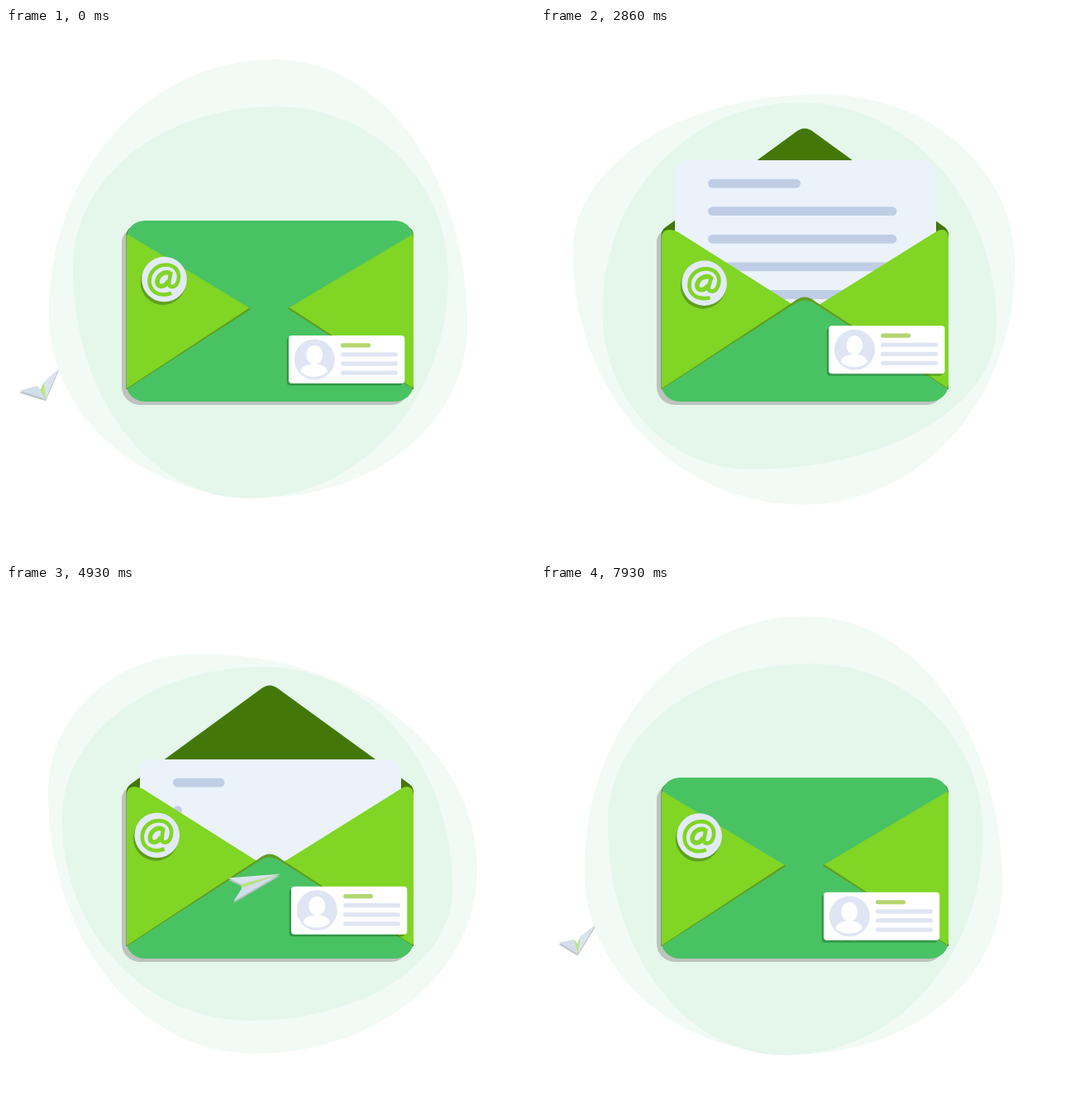
Recreate the animation shown at these times as an HTML page with a canvas. Size 640 px wide and 640 px high, loop 8000 ms.

```html
<!DOCTYPE html>
<html lang="en">
<head>
<meta charset="utf-8">
<title>Email envelope</title>
<style>
  html, body { margin: 0; width: 100%; height: 100%; overflow: hidden; background: #fff; }
  canvas { display: block; width: 640px; height: 640px; }
</style>
</head>
<body>
<canvas id="stage"></canvas>
<script>
const LOOP = 8000, CYCLE = 4000, TAU = Math.PI * 2;
const canvas = document.getElementById('stage');
const ctx = canvas.getContext('2d');
const dpr = window.devicePixelRatio || 1;
canvas.width = canvas.height = 640 * dpr;

const GREEN = '#49c264', LIME = '#80d525', DARK = '#437809', OLIVE = '#5f9f1e';
const PAPER = '#ebf2fa', INK = '#bfcee4', PALE = '#dfe5f3';

// Top, right, bottom and left extremes; x and y are each [middle, cosine, sine].
const OUTER = [
  [[300, 25, 70], [64, -26, 0]],
  [[566, -8, 3], [335, 25, -42]],
  [[307, 0, 12], [570, -2, 7]],
  [[48, 4, -9], [295, 50, 10]]
];
const INNER = [
  [[318, 8, 0], [95, 0, -6]],
  [[541, -6, 8], [338, -38, -2]],
  [[283, 10, -30], [546, 23, 3]],
  [[75, 6, 4], [302, -12, 42]]
];

// Evenly timed stops of the floating parts: x, y and, for the badge, tilt.
const BADGE = [
  [191.5, 304, 0], [203.8, 310, 7], [199, 309.5, 6],
  [187.5, 301.5, 0], [183.5, 302.5, 0], [203, 293, 20]
];
const CARD = [[342, 372], [344.6, 365.3], [349.3, 359.8], [336.5, 367], [348, 363.3], [342.2, 361]];

// Attitude of the paper plane: time, vector to the nose, vector from wing to wing.
const ATTITUDE = [
  [0, 8, 23.5, 48, -27],
  [430, 70, -3, 47, -44],
  [1500, 26, -28, -59, -1],
  [2250, -45, -5, -20, 42],
  [3300, -50, 22, 5, 30]
];

const BODY = new Path2D();
BODY.roundRect(145.5, 233, 347.5, 219, 22);
const FLAP = new Path2D('M146 249 Q146 233 168 233 H471 Q493 233 493 249 L333 344 Q319 354 305 345 Z');
const FLAP_OPEN = new Path2D('M146 252 Q146 245 150 241.5 L308 126 Q319 117 330 126 L489 241.5 Q493 245 493 252 Z');
const BACK = new Path2D('M145.5 437 V252 Q145.5 240 158 240 H481 Q493 240 493 252 V437 Z');
const SIDES = new Path2D(
  'M146 452 V254 Q146 244 155 244 Q161 244 166 247 L302 333 L319 344 Z ' +
  'M493 452 V254 Q493 244 485 244 Q481 244 477 247 L337 334.5 L319 345 Z');
const FRONT_SHADE = new Path2D('M146 436 L306 331 Q319 320 332 331 L493 436 Z');
const FRONT = new Path2D('M146 437 L306 334 Q319 325 332 334 L493 437 V452 H146 Z');
const AT_RING = new Path2D('M8.5 16.8 C-6 22 -18 15 -18 2 C-18 -9 -9 -17.5 2 -17.5 C12 -17.5 17.5 -11 17.5 -3 C17.5 4 14 9 9.5 9 C6 9 5 6.5 5.8 3 L8 -9');
const AT_BOWL = new Path2D('M7 -7.5 C-2 -10.5 -8.5 -3 -8.5 3.5 C-8.5 10 .5 10.5 5 2');

const mix = (a, b, k) => a + (b - a) * k;

function ease(t, from, to) {
  const p = Math.min(1, Math.max(0, (t - from) / (to - from)));
  return (1 - Math.cos(Math.PI * p)) / 2;
}

// Smooth periodic curve through rows of [position, ...values].
function curve(rows, span, x) {
  const n = rows.length;
  let k = n - 1;
  while (k > 0 && rows[k][0] > x) k--;
  const row = j => rows[(j + n) % n];
  const pos = j => row(j)[0] + Math.floor(j / n) * span;
  const [t0, t1, t2, t3] = [k - 1, k, k + 1, k + 2].map(pos);
  const h = t2 - t1, u = (x - t1) / h;
  return row(k).slice(1).map((b, i) => {
    const a = row(k - 1)[i + 1], c = row(k + 1)[i + 1], d = row(k + 2)[i + 1];
    const m1 = (c - a) / (t2 - t0) * h, m2 = (d - b) / (t3 - t1) * h;
    return b + u * (m1 + u * (3 * (c - b) - 2 * m1 - m2 + u * (2 * (b - c) + m1 + m2)));
  });
}

function float(stops, t) {
  const n = stops.length;
  return curve(stops.map((s, i) => [i, ...s]), n, t / LOOP * n);
}

function fill(color, path) {
  ctx.fillStyle = color;
  ctx.fill(path);
}

function box(color, x, y, w, h, r) {
  const p = new Path2D();
  p.roundRect(x, y, w, h, r);
  fill(color, p);
}

function oval(color, x, y, rx, ry = rx) {
  const p = new Path2D();
  p.ellipse(x, y, rx, ry, 0, 0, TAU);
  fill(color, p);
}

function poly(color, points, dy = 0) {
  const p = new Path2D();
  points.forEach(([x, y]) => p.lineTo(x, y + dy));
  p.closePath();
  fill(color, p);
}

function blob(color, extremes, t) {
  const a = t / LOOP * TAU;
  const points = extremes.map(xy => xy.map(([m, c, s]) => m + c * Math.cos(a) + s * Math.sin(a)));
  const p = new Path2D();
  p.moveTo(...points[0]);
  points.forEach(([ax, ay], i) => {
    const [bx, by] = points[(i + 1) % 4], k = 0.56;
    if (i % 2) p.bezierCurveTo(ax, mix(ay, by, k), mix(bx, ax, k), by, bx, by);
    else p.bezierCurveTo(mix(ax, bx, k), ay, bx, mix(by, ay, k), bx, by);
  });
  fill(color, p);
}

function flap(color, path, s) {
  ctx.save();
  ctx.translate(319.5, 239);
  ctx.scale(1 - 0.055 * (1 - s * s), Math.abs(s));
  ctx.translate(-319.5, -239);
  fill(color, path);
  ctx.restore();
}

function letter(c) {
  const top = 245 - 85 * (ease(c, 700, 1230) - ease(c, 2900, 3350));
  box(PAPER, 162, top, 316, 200, 14);
  for (let i = 0; i < 5; i++) {
    const start = 770 + 128 * i;
    const w = (i ? 228.5 : 112) * ease(c, start, start + 300);
    if (w > 0) box(INK, 202, top + 22.7 + 33.6 * i, Math.max(w, 11), 10.8, 5.4);
  }
}

function envelope(c) {
  const s = 1 - 2 * (ease(c, 240, 830) - ease(c, 3380, 3880));
  box('#bcc4be', 140, 243, 348, 213, [16, 16, 22, 22]);
  if (s < 0) flap(DARK, FLAP_OPEN, s);
  fill(DARK, BACK);
  letter(c);
  ctx.save();
  ctx.clip(BODY);
  fill(LIME, SIDES);
  fill(OLIVE, FRONT_SHADE);
  fill(GREEN, FRONT);
  if (s > 0) flap(GREEN, FLAP, s);
  ctx.restore();
}

function badge(t) {
  const [x, y, tilt] = float(BADGE, t);
  ctx.save();
  ctx.translate(x, y);
  oval(OLIVE, -1.5, 3.7, 27.3);
  oval('#e3eaf6', 0, 0, 27.3);
  ctx.rotate(tilt / 360 * TAU);
  ctx.strokeStyle = LIME;
  ctx.lineWidth = 4.7;
  ctx.stroke(AT_RING);
  ctx.lineWidth = 5.6;
  ctx.stroke(AT_BOWL);
  ctx.restore();
}

function card(t) {
  const [x, y] = float(CARD, t);
  ctx.save();
  ctx.translate(x, y);
  box('rgba(0,60,10,.32)', -2.3, 2.6, 140, 58, 4);
  box('#fff', 0, 0, 140.3, 58, 4);
  oval(PALE, 31.3, 29, 24.5);
  oval('#fff', 31.2, 23.5, 10, 11.5);
  fill('#fff', new Path2D('M14.5 43.5 C16 31.5 45.5 31.5 47 43.5 C40 52 21.5 52 14.5 43.5 Z'));
  box('#b3d56e', 63, 9.3, 36, 5.2, 2.6);
  for (let i = 0; i < 3; i++) box(PALE, 63, 20.4 + 11.1 * i, 69, 5.2, 2.6);
  ctx.restore();
}

function plane(c) {
  const a = c / CYCLE * TAU;
  const x = 306 - 266 * Math.cos(a) - 12 * Math.sin(2 * a) * (1 + Math.sin(a));
  const y = 328 + 102 * Math.cos(a - 0.3);
  const [fx, fy, sx, sy] = curve(ATTITUDE, CYCLE, c);
  const at = (f, s, drop = 0) => [x + f * fx + s * sx, y + f * fy + s * sy + drop];
  const nose = at(1, 0), inA = at(0.22, -0.08), inB = at(0.22, 0.08);
  const wingA = [nose, at(0, -0.5), inA], wingB = [nose, at(0, 0.5), inB];
  const keel = [nose, inA, at(0.22, 0, 0.28 * Math.hypot(fx, fy)), inB];
  [wingB, keel, wingA].forEach(part => poly('#b9c3c4', part, 2.2));
  poly('#dae3ee', wingB);
  poly('#b9e67c', keel);
  poly('#d3deeb', wingA);
}

const start = performance.now();

function draw() {
  const t = (performance.now() - start) % LOOP, c = t % CYCLE;
  const inFront = c > 60 && c < 2000;
  ctx.setTransform(dpr, 0, 0, dpr, 0, 0);
  ctx.clearRect(0, 0, 640, 640);
  blob('#f1faf5', OUTER, t);
  blob('#e5f6eb', INNER, t);
  if (!inFront) plane(c);
  envelope(c);
  badge(t);
  card(t);
  if (inFront) plane(c);
  requestAnimationFrame(draw);
}
draw();
</script>
</body>
</html>
```
